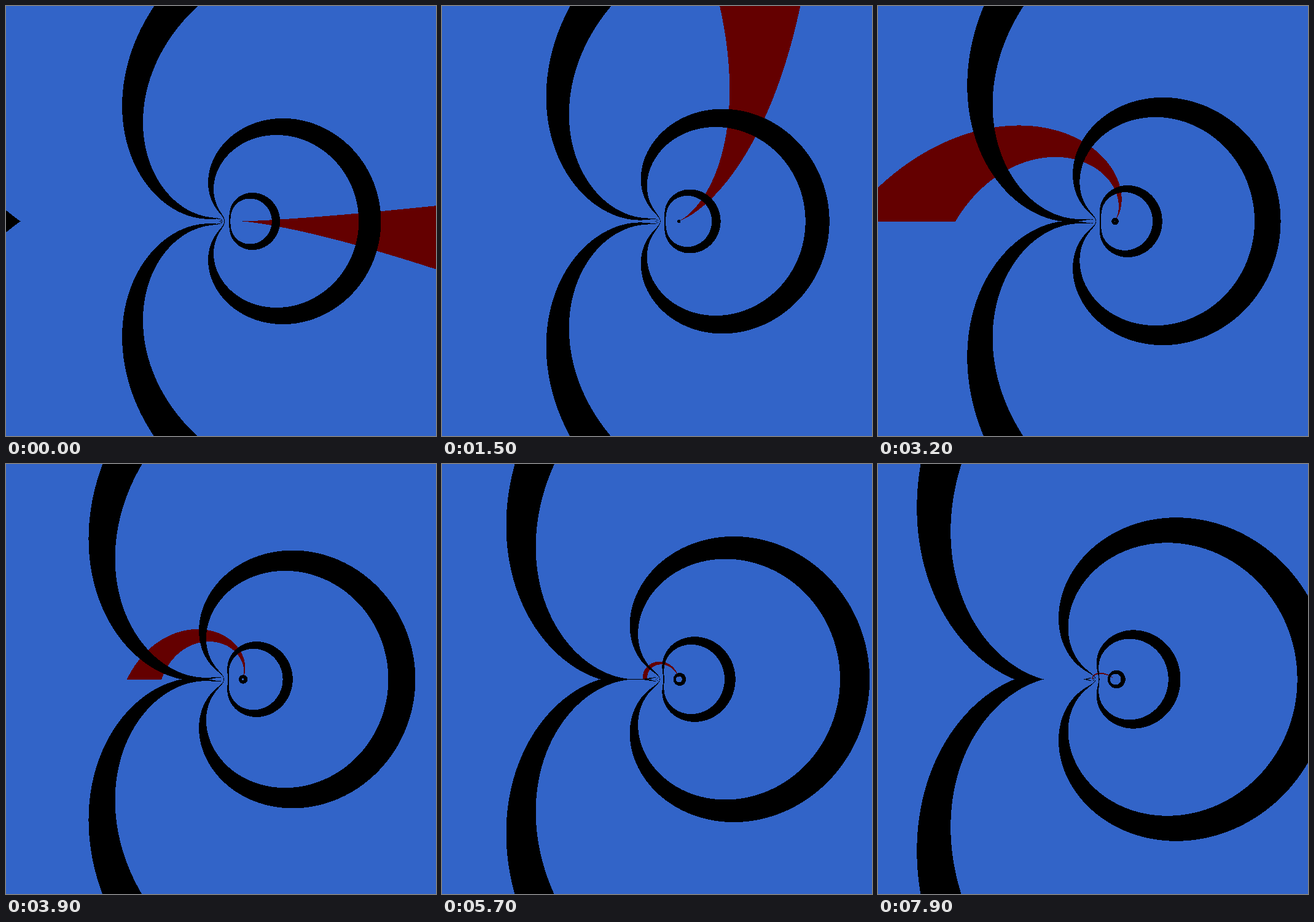
These frames come from a looping animation (700 px wide and 700 px high, 8 s). An HTML page with a canvas:

```html
<!DOCTYPE html>
<html lang="en">
<head>
<meta charset="utf-8">
<title>Complex logarithm</title>
<style>
  html, body { margin: 0; width: 100%; height: 100%; overflow: hidden; background: #3264c8; }
  canvas { display: block; width: 700px; height: 700px; }
</style>
</head>
<body>
<canvas id="stage" width="700" height="700"></canvas>
<script>
const SIZE = 700, UNIT = 35, STEP_MS = 100, STEPS = 80, SHIFT = 0.005;
const RING_WIDTH = 0.15, SECTOR_WIDTH = 0.02;

const ctx = document.getElementById("stage").getContext("2d");
const image = ctx.createImageData(SIZE, SIZE);
const pixels = new Uint32Array(image.data.buffer);
const modulus = new Float64Array(SIZE * SIZE);
const turns = new Float64Array(SIZE * SIZE);

// Packed as ABGR for little-endian writes
const pack = (r, g, b) => (255 << 24 | b << 16 | g << 8 | r) >>> 0;
const BLUE = pack(50, 100, 200), RED = pack(100, 0, 0), BLACK = pack(0, 0, 0);

const fract = v => v - Math.floor(v);

// Polar form of w = log z for every pixel
for (let row = 0, i = 0; row < SIZE; row++) {
  for (let col = 0; col < SIZE; col++, i++) {
    const x = (col - SIZE / 2) / UNIT, y = (SIZE / 2 - row) / UNIT;
    const re = Math.log(Math.hypot(x, y)), im = Math.atan2(y, x);
    modulus[i] = Math.hypot(re, im);
    turns[i] = Math.atan2(im, re) / (2 * Math.PI);
  }
}

// Rings widen and the sector turns by the same phase
function draw(step) {
  const phase = SHIFT * (step + 1);
  for (let i = 0; i < pixels.length; i++) {
    pixels[i] = fract(modulus[i] - phase) > 1 - RING_WIDTH ? BLACK
      : fract(turns[i] - phase) > 1 - SECTOR_WIDTH ? RED
      : BLUE;
  }
  ctx.putImageData(image, 0, 0);
}

let start = null, shown = 0;
draw(0);

function tick() {
  const now = performance.now();
  if (start === null) start = now;
  const step = Math.floor((now - start) / STEP_MS) % STEPS;
  if (step !== shown) draw(shown = step);
  requestAnimationFrame(tick);
}
requestAnimationFrame(tick);
</script>
</body>
</html>
```
